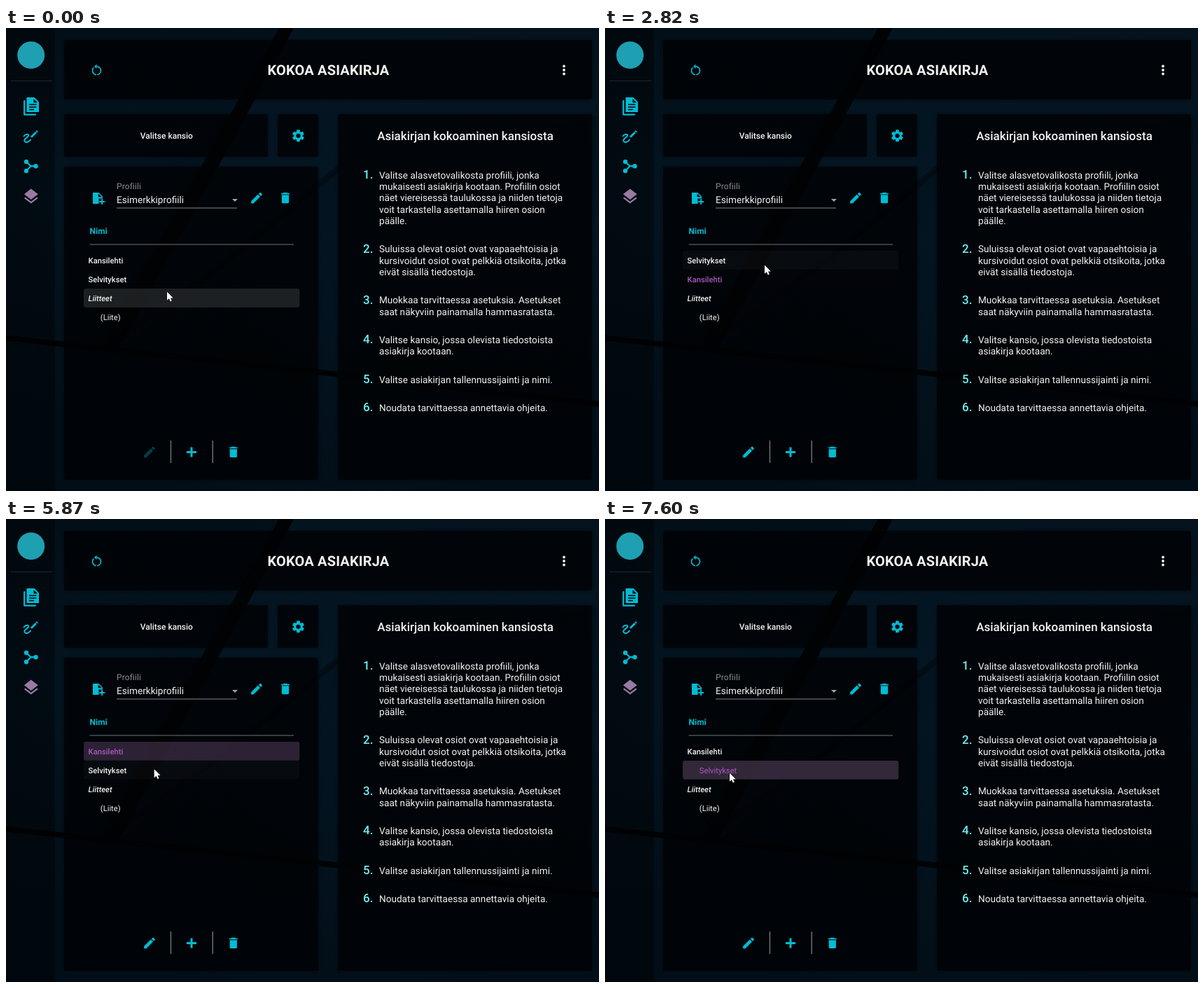
These frames come from a looping animation (847x661 px, 8 s). An HTML page with a canvas:

```html
<!DOCTYPE html>
<html lang="fi">
<head>
<meta charset="utf-8">
<title>Kokoa asiakirja</title>
<style>
html, body { margin: 0; width: 100%; height: 100%; overflow: hidden; background: #000; }
canvas { display: block; width: 847px; height: 661px; }
</style>
</head>
<body>
<canvas id="stage" width="847" height="661"></canvas>
<script>
const W = 847, H = 661, LOOP = 8000, TAU = Math.PI * 2;
const CYAN = '#00bcd4', DARK = '#02080d', FONT = 'Roboto, sans-serif';

const screen = document.getElementById('stage').getContext('2d');
const base = document.createElement('canvas');
base.width = W;
base.height = H;
let g = base.getContext('2d');

function rect(x, y, w, h, fill, r = 0) {
  g.fillStyle = fill;
  g.beginPath();
  g.roundRect(x, y, w, h, r);
  g.fill();
}

function disc(x, y, r, fill) {
  g.fillStyle = fill;
  g.beginPath();
  g.arc(x, y, r, 0, TAU);
  g.fill();
}

function poly(points, fill) {
  g.fillStyle = fill;
  g.beginPath();
  points.forEach(([x, y]) => g.lineTo(x, y));
  g.closePath();
  g.fill();
}

function stroke(d, width, color, cap = 'round') {
  g.lineWidth = width;
  g.strokeStyle = color;
  g.lineCap = cap;
  g.lineJoin = 'round';
  g.stroke(new Path2D(d));
}

function label(str, x, y, size, { weight = 400, color = '#f2f2f2', align = 'left', style = '', gap = 0 } = {}) {
  g.textRendering = 'geometricPrecision';
  g.font = `${style} ${weight} ${size}px ${FONT}`;
  g.letterSpacing = gap + 'px';
  g.textAlign = align;
  g.fillStyle = color;
  g.fillText(str, x, y);
}

// Icons are drawn on a 24-unit grid around their centre.
function icon(paint, cx, cy, size, color = CYAN) {
  g.save();
  g.translate(cx, cy);
  g.scale(size / 24, size / 24);
  paint(color);
  g.restore();
}

function pencil(color) {
  g.translate(-9, 9);
  g.rotate(-Math.PI / 4);
  const r = 2.65;
  poly([[0, 0], [r, r], [18.3, r], [18.3, -r], [r, -r]], color);
  rect(19.8, -r, 3.8, 2 * r, color, [0, 1.4, 1.4, 0]);
}

function bin(color) {
  rect(-6, -5, 12, 14, color, [0, 0, 2, 2]);
  rect(-7, -8, 14, 2, color);
  rect(-3.5, -9, 7, 2, color);
}

function restart(color) {
  g.strokeStyle = color;
  g.lineWidth = 2;
  g.lineCap = 'butt';
  [[-.25, .23], [.27, .625]].forEach(([a, b]) => {
    g.beginPath();
    g.arc(0, 1, 7, a * TAU, b * TAU);
    g.stroke();
  });
  poly([[0, -10], [-4, -6], [0, -2]], color);
}

function layers(color) {
  poly([[0, -10], [9, -3], [0, 4], [-9, -3]], color);
  poly([[-9, 2.07], [-7.4, .8], [0, 6.5], [7.4, .8], [9, 2.07], [0, 9.07]], color);
}

function gear(color) {
  g.fillStyle = color;
  g.beginPath();
  for (let i = 0; i < 6; i++) {
    const a = (i / 6 - .25) * TAU;
    [[-.42, 7.1], [-.25, 10], [.25, 10], [.42, 7.1]].forEach(([da, r]) =>
      g.lineTo(r * Math.cos(a + da), r * Math.sin(a + da)));
  }
  g.closePath();
  g.moveTo(3.6, 0);
  g.arc(0, 0, 3.6, 0, TAU);
  g.fill('evenodd');
}

function glow(x, y, r, color) {
  const grad = g.createRadialGradient(x, y, 0, x, y, r);
  grad.addColorStop(0, color);
  grad.addColorStop(1, 'rgba(4,26,42,0)');
  rect(0, 0, W, H, grad);
}

function backdrop() {
  rect(0, 0, W, H, '#020e17');
  glow(460, 300, 420, 'rgba(4,26,42,.55)');
  glow(80, 240, 300, 'rgba(4,26,42,.5)');
  glow(840, 300, 320, 'rgba(4,26,42,.6)');
  poly([[411, 0], [W, 0], [W, 125], [474, 200], [161, 458]], 'rgba(10,34,50,.22)');
  poly([[390, 0], [411, 0], [161, 458], [132, 458]], 'rgba(0,0,0,.85)');
  stroke('M-5 442L140 458L480 495L850 537', 8, 'rgba(0,0,0,.85)');
  stroke('M145 455L305 340L474 201', 9, 'rgba(0,0,0,.35)');
  rect(0, 0, 70, H, 'rgba(0,0,0,.42)');
  g.shadowColor = 'rgba(0,0,0,.6)';
  g.shadowBlur = 6;
  const panel = (x, y, w, h) => rect(x, y, w, h, 'rgba(0,2,5,.72)', 2);
  panel(83, 17, 754, 85);
  panel(83, 123, 291, 61);
  panel(388, 123, 58, 61);
  panel(83, 198, 363, 447);
  panel(474, 123, 363, 522);
  g.shadowColor = 'transparent';
}

function sidebar() {
  disc(35.7, 38.7, 19.5, '#1f9fb2');
  rect(7, 75, 59, 1, '#20282e');

  poly([[29.5, 99], [40.5, 99], [47, 105.5], [47, 120], [29.5, 120]], CYAN);
  poly([[39.5, 101], [39.5, 106.5], [45, 106.5]], DARK);
  for (let i = 0; i < 3; i++) rect(33, 108.5 + i * 3.6, i < 2 ? 10.5 : 7, 1.6, DARK);
  stroke('M26.2 104V123.6H42', 2.2, CYAN);

  stroke('M25.5 154.5C28 151 33.5 151 32 154C30.5 157 25 158 26.5 161.5C28.5 165 33.5 162 35 159.5', 2, CYAN);
  icon(pencil, 40.6, 151.2, 13.5);

  stroke('M29 191L35.5 197.2L29 204M35.5 197.2H43', 2.2, CYAN);
  disc(29, 191, 3.2, CYAN);
  disc(29, 204, 3.2, CYAN);
  disc(42.5, 197.3, 3.3, CYAN);

  icon(layers, 35.8, 240.6, 26.5, '#987aa3');
}

function plus(x, y, size, width) {
  rect(x - size / 2, y - width / 2, size, width, CYAN);
  rect(x - width / 2, y - size / 2, width, size, CYAN);
}

function profile() {
  poly([[124, 235], [132.5, 235], [138, 240.5], [138, 251], [124, 251]], CYAN);
  poly([[131.7, 236.2], [131.7, 241.3], [136.8, 241.3]], DARK);
  rect(132.5, 243.5, 9, 9, DARK);
  plus(137.2, 248, 8, 2);
  label('Profiili', 158, 230, 12, { color: '#8b8e90', gap: .11 });
  label('Esimerkkiprofiili', 158, 250, 13.6);
  rect(158, 256.5, 172, 1, '#85888a');
  poly([[323, 244], [331, 244], [327, 248]], '#a0a3a5');
  icon(pencil, 358, 242.7, 21);
  icon(bin, 399, 242.6, 20.5);
  label('Nimi', 119.5, 293.5, 12, { weight: 700, color: CYAN });
  rect(119.5, 308.5, 291.5, 1, '#707476');
}

function guide() {
  label('Asiakirjan kokoaminen kansiosta', 656, 160, 17, { weight: 500, align: 'center' });
  const steps = [
    ['Valitse alasvetovalikosta profiili, jonka', 'mukaisesti asiakirja kootaan. Profiilin osiot',
      'näet viereisessä taulukossa ja niiden tietoja', 'voit tarkastella asettamalla hiiren osion', 'päälle.'],
    ['Suluissa olevat osiot ovat vapaaehtoisia ja', 'kursivoidut osiot ovat pelkkiä otsikoita, jotka',
      'eivät sisällä tiedostoja.'],
    ['Muokkaa tarvittaessa asetuksia. Asetukset', 'saat näkyviin painamalla hammasratasta.'],
    ['Valitse kansio, jossa olevista tiedostoista', 'asiakirja kootaan.'],
    ['Valitse asiakirjan tallennussijainti ja nimi.'],
    ['Noudata tarvittaessa annettavia ohjeita.']
  ];
  let y = 214.6;
  steps.forEach((lines, i) => {
    label(`${i + 1}.`, 510, y + .3, 17, { weight: 500, color: '#6cf0f4' });
    lines.forEach(s => {
      label(s, 533, y, 13.6);
      y += 16.35;
    });
    y += 24;
  });
}

function drawBase() {
  backdrop();
  sidebar();
  icon(restart, 129.5, 60, 20.5);
  label('KOKOA ASIAKIRJA', 460.5, 67, 20, { weight: 700, align: 'center', gap: .15 });
  for (let i = -1; i < 2; i++) disc(797, 60 + i * 5.5, 1.9, '#f0f0f0');
  label('Valitse kansio', 229.3, 157.7, 12, { weight: 500, align: 'center' });
  icon(gear, 417.5, 153.8, 21);
  profile();
  guide();
  rect(234.7, 589, 1.5, 32, '#6c7073');
  rect(294.5, 589, 1.5, 32, '#6c7073');
  plus(265, 605.5, 14, 3);
  icon(bin, 324.8, 605.4, 20.5);
}

const ramp = (t, start, dur) => Math.min(1, Math.max(0, (t - start) / dur));
const mix = (a, b, k) => a + (b - a) * k;

const ROW = 27.05, TOP = 318, FADE = 300;
const PICK_FIRST = 1580, PICK_SECOND = 6430, INDENT = 7600;
const first = { text: 'Kansilehti', weight: 500 };
const second = { text: 'Selvitykset', weight: 500 };
const rest = [second, { text: 'Liitteet', weight: 500, style: 'italic' }, { text: '(Liite)', weight: 400, inner: true }];
const items = [first, ...rest];

// The first item is moved to another row at these times.
const moves = [[0, 0], [2750, 1], [3380, 3], [4410, 1], [4970, 0]];
const lastMove = t => moves.filter(([at]) => at <= t).pop() || moves[0];

function orderAt(t) {
  const list = [...rest];
  list.splice(lastMove(t)[1], 0, first);
  return list;
}

function cursorAt(t) {
  const k = ramp(t, 600, 840), s = ramp(t, 5800, 420);
  const curve = (a, b, c) => a * (1 - s) ** 2 + 2 * b * s * (1 - s) + c * s * s;
  return s ? [curve(228, 175, 178), curve(338, 402, 362)] : [mix(230, 228, k), mix(376, 338, k)];
}

// Share of the last moments that the pointer spent on the item.
function hoverLevel(item, t) {
  const n = 15, since = item === first ? lastMove(t)[0] : -FADE;
  let hits = 0;
  for (let i = 0; i < n; i++) {
    const s = t - i * FADE / n;
    const row = Math.floor((cursorAt(s)[1] - TOP) / ROW);
    if (s >= since && orderAt(s)[row] === item) hits++;
  }
  return hits / n;
}

function pickLevel(item, t, dur) {
  if (item === first) return ramp(t, PICK_FIRST, dur) - ramp(t, PICK_SECOND, dur);
  return item === second ? ramp(t, PICK_SECOND, dur) : 0;
}

function rowPath(r) {
  g.beginPath();
  g.roundRect(111, TOP + r * ROW, 308.3, 26.8, 3);
}

function drawRow(item, r, t) {
  const fresh = item === first && t >= moves[1][0] ? ramp(t, lastMove(t)[0], 400) ** 2 : 1;
  rowPath(r);
  g.fillStyle = `rgba(171,71,188,${.14 * fresh * pickLevel(item, t, FADE)})`;
  g.fill();
  g.fillStyle = `rgba(255,255,255,${.11 * hoverLevel(item, t)})`;
  g.fill();
}

function drawName(item, r, t) {
  const k = pickLevel(item, t, 450);
  const inner = item.inner || (item === second && t >= INDENT);
  label(item.text, inner ? 134.8 : 117.6, TOP + r * ROW + 17.5, 11.2, {
    weight: inner ? 400 : item.weight,
    style: item.style,
    color: `rgb(${mix(242, 171, k)},${mix(242, 90, k)},${mix(242, 190, k)})`
  });
}

function drawRipple(start, r, t) {
  const age = t - start;
  if (age < 0 || age > 630) return;
  const [x, y] = cursorAt(start);
  g.save();
  rowPath(r);
  g.clip();
  disc(x, y, 310 * ramp(age, 0, 380), `rgba(255,255,255,${.18 * ramp(age, 0, 120) * (1 - ramp(age, 420, 210))})`);
  g.restore();
}

function drawCursor(x, y) {
  g.save();
  g.translate(x, y + .6);
  const arrow = 'M0 0V12.2L2.9 9.6L4.8 13.8L6.8 12.9L4.9 8.8H8.8Z';
  stroke(arrow, 1.4, '#0a0a0a');
  g.fillStyle = '#fff';
  g.fill(new Path2D(arrow));
  g.restore();
}

function draw(t) {
  g.drawImage(base, 0, 0);
  g.globalAlpha = mix(.32, 1, ramp(t, PICK_FIRST, FADE));
  icon(pencil, 205, 605.4, 21);
  g.globalAlpha = 1;
  const order = orderAt(t);
  order.forEach((item, r) => drawRow(item, r, t));
  drawRipple(PICK_FIRST, 0, t);
  drawRipple(PICK_SECOND, 1, t);
  order.forEach((item, r) => drawName(item, r, t));
  drawCursor(...cursorAt(t));
}

drawBase();
g = screen;
const begin = performance.now();
function tick() {
  draw((performance.now() - begin) % LOOP);
  requestAnimationFrame(tick);
}
tick();
</script>
</body>
</html>
```
